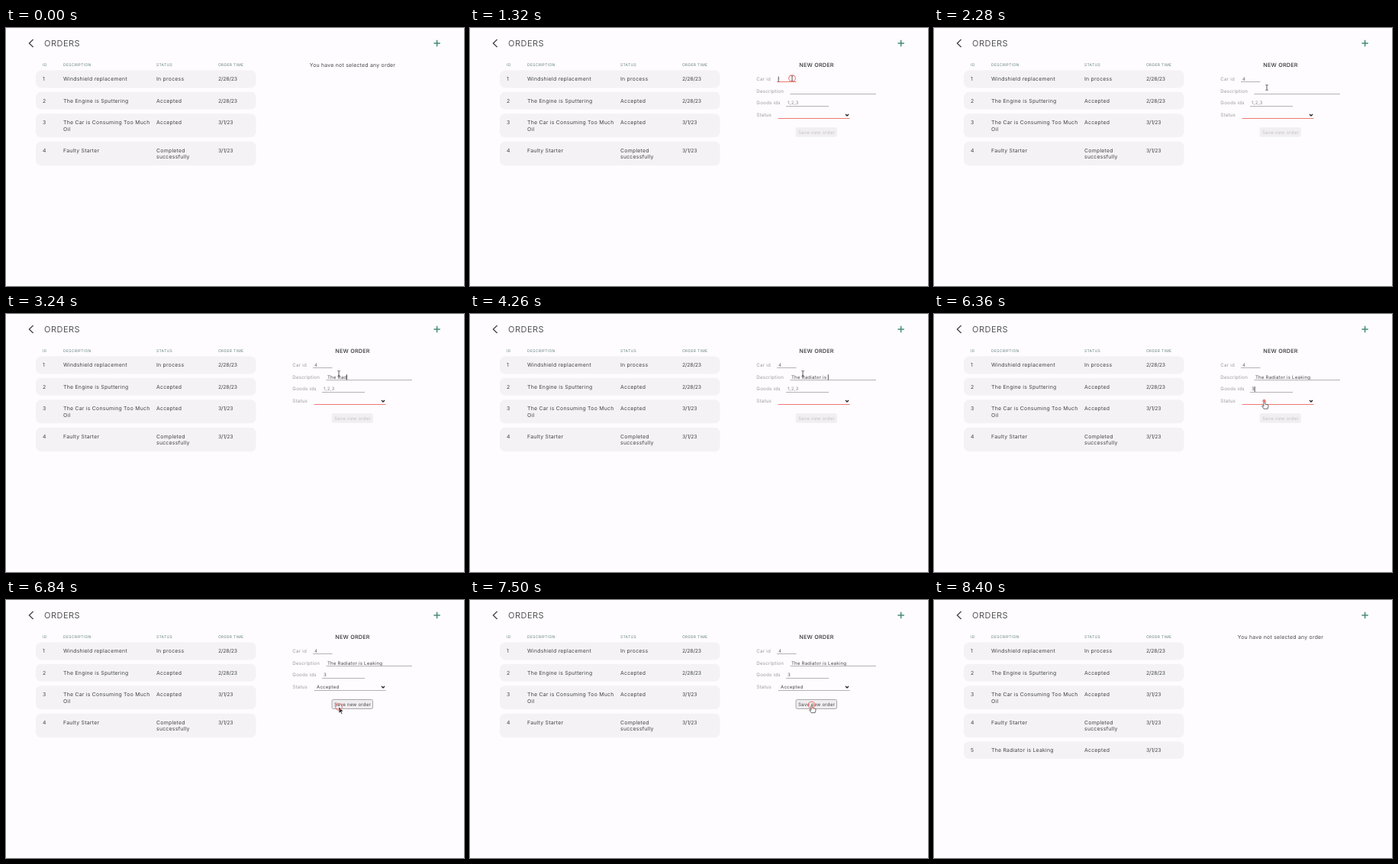
Recreate the animation shown at these times as an HTML page. Size 600 by 338 pixels, loop 8.88 s.

```html
<!DOCTYPE html>
<html lang="en">
<head>
<meta charset="utf-8">
<title>Orders</title>
<style>
  html, body { margin: 0; width: 100%; height: 100%; overflow: hidden; background: #fefcff; }
  svg { display: block; width: 100vw; height: 100vh; }
  text { font: 6.9px Inter, "Open Sans", sans-serif; letter-spacing: .035em; fill: #444;
         white-space: pre; text-rendering: geometricPrecision; }
  .title { font-size: 11px; letter-spacing: .045em; fill: #555; }
  .head { font-size: 5px; letter-spacing: .06em; fill: #65817d; }
  .date { font-size: 6.8px; letter-spacing: -.02em; }
  .label { font-size: 6.2px; fill: #999; }
  .input { font-size: 6.1px; fill: #444; }
  .mid { text-anchor: middle; }
  .strong { font-size: 7.2px; font-weight: 500; fill: #333; }
</style>
</head>
<body>
<svg id="stage" viewBox="0 0 600 338"></svg>
<script>
const LOOP = 8880, STEP = 60, RING_TIME = 180;
const RED = "#ee7a74", GREY = "#b4b2b5";
const stage = document.getElementById("stage");

function add(parent, tag, attrs = {}, content = "") {
  const node = document.createElementNS("http://www.w3.org/2000/svg", tag);
  for (const key in attrs) node.setAttribute(key, attrs[key]);
  node.textContent = content;
  parent.append(node);
  return node;
}
const group = (parent = stage) => add(parent, "g");
const label = (parent, x, y, content, cls = "") => add(parent, "text", { x, y, class: cls }, content);
const path = (parent, d, stroke, width = 1, fill = "none") =>
  add(parent, "path", { d, stroke, "stroke-width": width, fill });
const show = (node, on) => node.setAttribute("visibility", on ? "inherit" : "hidden");
const within = (t, from, to) => t >= from && t < to;

// Header and order table
path(stage, "M35.6 15 30.4 20 35.6 25", "#444", 1.3);
label(stage, 50, 24, "ORDERS", "title");
path(stage, "M560.4 20h8.4M564.6 15.8v8.4", "#478a78", 1.5);
const columns = [48, 75, 197, 278];
["ID", "DESCRIPTION", "STATUS", "ORDER TIME"].forEach((name, i) =>
  label(stage, columns[i], 49.6, name, "head"));

function orderRow(y, height, ...cells) {
  const row = group();
  add(row, "rect", { x: 39, y, width: 288.5, height, rx: 7, fill: "#f4f2f5" });
  cells.forEach((cell, i) => cell.split("\n").forEach((line, n) =>
    label(row, columns[i], y + 13.9 + n * 8.4, line, i === 3 ? "date" : "")));
  return row;
}
orderRow(55.4, 23, "1", "Windshield replacement", "In process", "2/28/23");
orderRow(83.8, 23, "2", "The Engine is Sputtering", "Accepted", "2/28/23");
orderRow(112.2, 31, "3", "The Car is Consuming Too Much\nOil", "Accepted", "3/1/23");
orderRow(148.8, 31.4, "4", "Faulty Starter", "Completed\nsuccessfully", "3/1/23");
const newRow = orderRow(185.2, 23, "5", "The Radiator is Leaking", "Accepted", "3/1/23");
const emptyNote = label(stage, 454, 51.2, "You have not selected any order", "mid");

// New order form
const form = group();
label(form, 454, 51.2, "NEW ORDER", "mid strong");

function field(row, name, x, width, indent) {
  const y = 69 + row * 15.7;
  label(form, 375.3, y, name, "label");
  return {
    x: x + indent,
    y,
    value: label(form, x + indent, y, "", "input"),
    line: path(form, `M${x} ${70.5 + row * 16}h${width}`, GREY)
  };
}
const car = field(0, "Car id", 402, 25.5, 2);
const description = field(1, "Description", 419.5, 112.5, 1.4);
const goods = field(2, "Goods ids", 414, 56, 2);
const status = field(3, "Status", 403.5, 94, 3.5);
car.value.style.fill = "#666";
path(form, "M492 113 494 115 496 113", "#222", 1.3);
const caret = path(form, "M0-5.4v7", "#222", .8);

const button = add(form, "rect", { x: 427, y: 130.5, width: 53.5, height: 12, rx: 1.8, "stroke-width": .7 });
const buttonText = label(form, 454, 138.6, "Save new order", "mid input");

const menu = group();
add(menu, "rect", { x: 403.5, y: 119.5, width: 94, height: 57, fill: "#fff", stroke: "#bbb", "stroke-width": .7 });
const highlight = add(menu, "rect", { x: 404, width: 93, height: 14, fill: "#d9d9dd" });
["", "Accepted", "In process", "Completed successfully"].forEach((option, i) =>
  label(menu, 407, 129 + i * 14, option, "input"));

// Pointer
const pointer = group();
const shapes = {
  arrow: path(pointer, "M0 0V8.3L2 6.5 3.4 9.5 4.7 8.9 3.4 6H6Z", "#fff", .6, "#222"),
  hand: path(pointer, "M-.6 1Q.4-.1 1.4 1V4.2L4.6 4.9Q5.7 5.2 5.5 7L4.6 10.2H-.4L-2.9 6.6Q-2.6 5.4-.6 6.9Z", "#444", .8, "#fff"),
  beam: path(pointer, "M-1.6-3.5Q0-3.5 0-2.5 0-3.5 1.6-3.5M0-2.5V2.5M-1.6 3.5Q0 3.5 0 2.5 0 3.5 1.6 3.5", "#333", .8)
};
const ring = add(stage, "circle", { stroke: RED, "stroke-width": 1.1 });

// [time, x, y]
const route = [
  [360, 598, 44], [600, 565, 20], [840, 565, 20], [1200, 422, 66], [1800, 422, 66],
  [2040, 436, 78], [5340, 436, 78], [5640, 432, 98], [6120, 432, 98], [6300, 432.5, 114],
  [6420, 432.5, 114], [6600, 436, 140], [6960, 436, 140], [7320, 447.5, 137.5],
  [8280, 447.5, 137.5], [8340, 518, 179]
];
const looks = [[0, "arrow"], [540, "hand"], [900, "arrow"], [1140, "beam"], [6180, "hand"],
  [6480, "arrow"], [7200, "hand"], [8340, "arrow"]];
const clicks = [660, 1260, 2100, 5700, 6360, 6780, 7440];

function pointerAt(t) {
  const next = route.findIndex(stop => stop[0] > t);
  if (next < 0) return route.at(-1).slice(1);
  if (next === 0) return route[0].slice(1);
  const [t0, x0, y0] = route[next - 1], [t1, x1, y1] = route[next];
  const p = (t - t0) / (t1 - t0), e = p * p * (3 - 2 * p);
  return [x0 + (x1 - x0) * e, y0 + (y1 - y0) * e];
}

// [text, first key time, key interval]
const typing = [["The ", 2520, 100], ["Radiator ", 3000, 97], ["i", 3900, 60], ["s ", 4080, 150], ["Leaking", 4440, 110]];
const typedAt = t => typing.map(([text, start, gap]) =>
  t < start ? "" : text.slice(0, Math.floor((t - start) / gap) + 1)).join("");

function focusedField(t) {
  if (within(t, 1260, 2100)) return car;
  if (within(t, 2160, 2280) || within(t, 2520, 5700)) return description;
  if (within(t, 5700, 6420)) return goods;
}

function render(t) {
  const formOpen = within(t, 780, 7800), chosen = t >= 6840;
  show(form, formOpen);
  show(emptyNote, !formOpen);
  show(newRow, t >= 7800);

  car.value.textContent = t >= 1680 ? "4" : "";
  car.line.setAttribute("stroke", t >= 1680 ? GREY : RED);
  description.value.textContent = typedAt(t);
  goods.value.textContent = t >= 6060 ? "3" : "1,2,3";
  goods.value.style.fill = t >= 6060 ? "#555" : "#888";
  status.value.textContent = chosen ? "Accepted" : "";
  status.line.setAttribute("stroke", chosen ? GREY : RED);
  button.setAttribute("fill", chosen ? "#efedf0" : "#f1eff2");
  button.setAttribute("stroke", chosen ? "#888" : "#f1eff2");
  buttonText.style.fill = chosen ? "#444" : "#c4c2c5";

  const focus = focusedField(t);
  show(caret, formOpen && focus);
  if (formOpen && focus) {
    const typed = focus !== goods || t >= 6060;
    const width = typed && focus.value.textContent ? focus.value.getComputedTextLength() : 0;
    caret.setAttribute("transform", `translate(${focus.x + width + .2} ${focus.y})`);
  }

  const [x, y] = pointerAt(t);
  show(menu, within(t, 6420, 6840));
  highlight.setAttribute("y", y > 126 ? 134 : 120);

  show(pointer, within(t, 360, 8400));
  pointer.setAttribute("transform", `translate(${x} ${y})`);
  const look = looks.findLast(([from]) => t >= from)[1];
  for (const name in shapes) show(shapes[name], name === look);

  const age = t - clicks.findLast(time => t >= time);
  show(ring, age < RING_TIME);
  if (age < RING_TIME) {
    ring.setAttribute("cx", x);
    ring.setAttribute("cy", y);
    ring.setAttribute("r", 1.6 + age * .045);
    ring.setAttribute("fill", age < STEP ? RED : "none");
    ring.setAttribute("opacity", 1 - Math.max(0, age - STEP) / RING_TIME);
  }
}

const origin = performance.now();
function tick() {
  const t = Math.max(0, performance.now() - origin) % LOOP;
  render(Math.floor(t / STEP) * STEP);
  requestAnimationFrame(tick);
}
tick();
</script>
</body>
</html>
```
